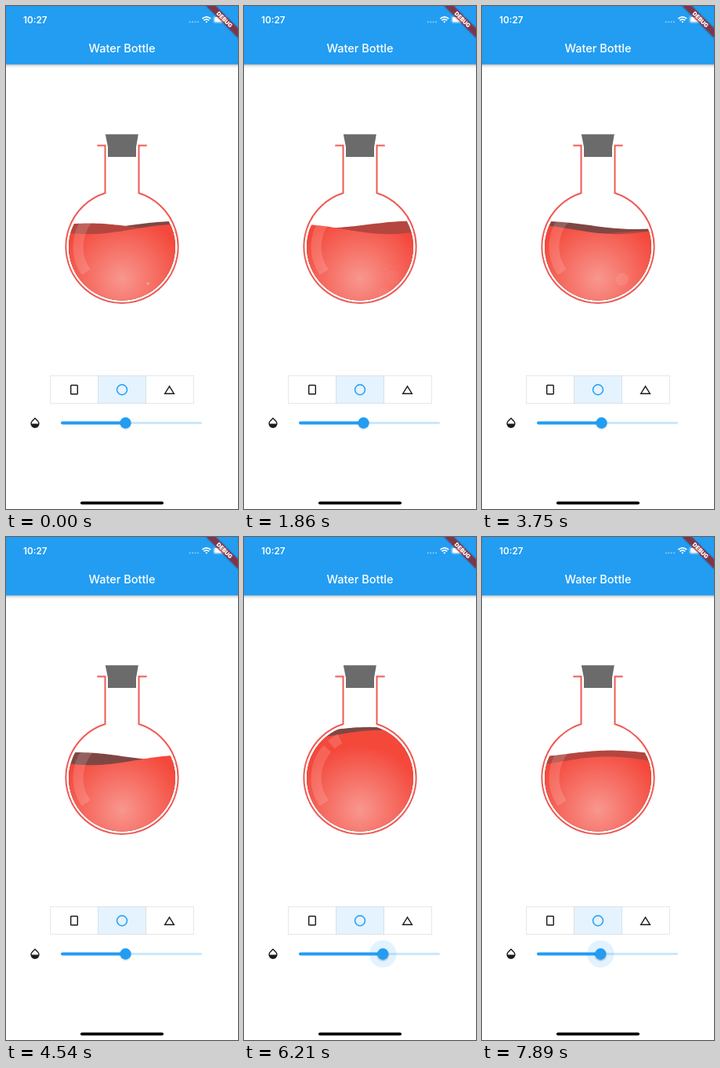
These frames come from a looping animation (296 px wide and 640 px high, 8 s). An HTML page:

```html
<!DOCTYPE html>
<html lang="en">
<head>
<meta charset="utf-8">
<title>Water Bottle</title>
<style>
  html, body { margin: 0; width: 100%; height: 100%; overflow: hidden; background: #fff; }
  svg { display: block; width: 100vw; height: 100vh; --blue: #229df2; --ink: #1c1c1c; }
  text { font-family: Inter, Roboto, sans-serif; fill: #fff; }
</style>
</head>
<body>
<svg viewBox="0 0 296 640" preserveAspectRatio="none">
  <defs>
    <radialGradient id="glow" gradientUnits="userSpaceOnUse" cx="148" cy="347" r="82">
      <stop offset="0" stop-color="#f8978f"/>
      <stop offset="1" stop-color="#f4483b"/>
    </radialGradient>
    <linearGradient id="shade" x2="0" y2="1">
      <stop offset="0" stop-color="#000" stop-opacity=".26"/>
      <stop offset=".4" stop-color="#000" stop-opacity=".1"/>
      <stop offset="1" stop-color="#000" stop-opacity="0"/>
    </linearGradient>
    <clipPath id="bowl"><circle cx="148" cy="306.5" r="68"/></clipPath>
    <clipPath id="wet"><path id="wetPath"/></clipPath>
    <filter id="blur" x="-50%" y="-50%" width="200%" height="200%"><feGaussianBlur stdDeviation="1.2"/></filter>
  </defs>
  <rect width="296" height="640" fill="#fff"/>

  <!-- app bar -->
  <rect y="74" width="296" height="5" fill="url(#shade)"/>
  <rect width="296" height="74.3" fill="var(--blue)"/>
  <text x="22" y="22" font-size="11.7" font-weight="600">10:27</text>
  <text x="148" y="59.3" font-size="14.5" font-weight="500" text-anchor="middle">Water Bottle</text>
  <path d="M234.8 20.3h12" stroke="#fff" stroke-opacity=".45" stroke-width="2.2" stroke-linecap="round" stroke-dasharray="0 3.4"/>
  <g fill="none" stroke="#fff" stroke-width="1.7">
    <path d="M250.4 16.2Q255.8 11.4 261.2 16.2M252.4 18.4Q255.8 15.4 259.2 18.4"/>
    <path d="M254.3 19.9Q255.8 18.6 257.3 19.9L255.8 21.4Z" fill="#fff" stroke="none"/>
  </g>
  <rect x="264.5" y="12.8" width="17.5" height="8.8" rx="2.6" fill="none" stroke="#fff" stroke-opacity=".45" stroke-width=".8"/>
  <rect x="265.7" y="14" width="15.1" height="6.4" rx="1.5" fill="#fff"/>
  <path d="M283 15.7q1.6 1.5 0 3z" fill="#fff" fill-opacity=".5"/>
  <g transform="translate(296 0) rotate(45)">
    <rect x="-28.6" y="20" width="57.2" height="8.6" fill="#000" opacity=".35" filter="url(#blur)"/>
    <rect x="-28.6" y="20" width="57.2" height="8.6" fill="#b71c1c" fill-opacity=".63"/>
    <text y="26.9" font-size="7.3" font-weight="900" text-anchor="middle">DEBUG</text>
  </g>

  <!-- flask -->
  <g clip-path="url(#bowl)">
    <path id="back" fill="#7f4744"/>
    <path id="mid" fill="#b4463f"/>
    <path id="front" fill="url(#glow)"/>
    <g id="bubbles" clip-path="url(#wet)" fill="#fff"></g>
    <g id="glare" fill="none" stroke="#fff" stroke-opacity=".15" stroke-width="13"></g>
  </g>
  <path d="M116.3 177.5H126.5V238A71.6 71.6 0 1 0 169.5 238V177.5H179.7" fill="none" stroke="#ee5a54" stroke-width="2"/>
  <path d="M126.8 163.2H168.8L166 179.5V192H130V179.5Z" fill="#6b6b6b"/>

  <!-- shape buttons -->
  <rect x="117.5" y="470.5" width="61" height="35" fill="var(--blue)" fill-opacity=".12"/>
  <path d="M56.5 470.5H239.5V505.5H56.5ZM117.5 470.5V505.5M178.5 470.5V505.5" fill="none" stroke="#000" stroke-opacity=".12" stroke-width=".8"/>
  <g fill="none" stroke="var(--ink)" stroke-width="1.45">
    <rect x="82.7" y="482.4" width="8.6" height="11.4" rx=".8"/>
    <circle cx="148" cy="488.2" r="6.45" stroke="var(--blue)"/>
    <path d="M208.5 483.9L214.3 493.2H202.7Z"/>
  </g>

  <!-- slider -->
  <path transform="translate(28.6 521.8) scale(.7)" fill="var(--ink)" d="M17.66 8L12 2.35 6.34 8C4.78 9.56 4 11.64 4 13.64s.78 4.11 2.34 5.67 3.61 2.35 5.66 2.35 4.1-.79 5.66-2.35S20 15.64 20 13.64 19.22 9.56 17.66 8zM6 14c.01-2 .62-3.27 1.76-4.4L12 5.27l4.24 4.38C17.38 10.77 17.99 12 18 14H6z"/>
  <rect x="70" y="529.1" width="180" height="2.8" rx="1.4" fill="var(--blue)" fill-opacity=".24"/>
  <rect id="active" x="70" y="528.4" height="4.2" rx="2.1" fill="var(--blue)"/>
  <g id="thumb">
    <circle id="halo" fill="var(--blue)" fill-opacity=".13"/>
    <circle id="thumbShadow" cy="1.4" r="7" fill="#000" filter="url(#blur)"/>
    <circle r="7.15" fill="var(--blue)"/>
  </g>
  <rect x="95" y="630.4" width="106" height="3.8" rx="1.9" fill="#000"/>
</svg>
<script>
const LOOP = 8000;
const el = id => document.getElementById(id);
const clamp = v => Math.max(0, Math.min(1, v));
const smooth = v => (1 - Math.cos(Math.PI * clamp(v))) / 2;

function add(parent, tag, attrs) {
  const node = document.createElementNS('http://www.w3.org/2000/svg', tag);
  for (const key in attrs) node.setAttribute(key, attrs[key]);
  el(parent).append(node);
  return node;
}

// The thumb is dragged right, then back; the water follows it.
const thumbX = t => 152.5 + 25 * smooth((t - 5000) / 1300) - 26.2 * smooth((t - 6400) / 1490);
const level = t => 278 - 1.3 * (thumbX(t) - 152.5);

// Each wave is one sine that slides sideways between turning points.
const WAVELENGTH = 230;
const turns = [0, 1080, 2750, 3750, 5210, 6210, 7890];
const waves = {
  back: { depth: 1, height: 5, crest: [216, 225, 205, 80, 100, 160, 165] },
  mid: { depth: 0, height: 4.5, crest: [105, 225, 205, 205, 205, 205, 165], sink: [3, 0, 0, 13, 13, 13, -3.5] },
  front: { depth: 6, height: 6.2, crest: [220, 330, 263, 287, 175, 175, 160] }
};

function between(points, t) {
  let i = 0;
  while (i < turns.length - 2 && t >= turns[i + 1]) i++;
  const k = smooth((t - turns[i]) / (turns[i + 1] - turns[i]));
  return points[i] + (points[i + 1] - points[i]) * k;
}

function surface({ depth, height, crest, sink }, t) {
  const rest = level(t) + depth + (sink ? between(sink, t) : 0);
  const top = between(crest, t);
  let d = 'M80 376';
  for (let x = 80; x <= 216; x += 4) {
    const y = rest - height * Math.cos(2 * Math.PI * (x - top) / WAVELENGTH);
    d += `L${x} ${y.toFixed(2)}`;
  }
  return d + 'L216 376Z';
}

// Bubbles drift up, fading in and out around their peak.
const bubbles = [
  { x: 181, y: 353, r: 1.6, peak: 0, life: 2200, alpha: .35 },
  { x: 190, y: 353, r: 9, peak: 1080, life: 1000, alpha: .15 },
  { x: 179, y: 355, r: 8, peak: 3000, life: 1500, alpha: .19 }
];
for (const b of bubbles) b.node = add('bubbles', 'circle', { cx: b.x, r: b.r });

function moveBubble({ node, y, peak, life, alpha }, t) {
  const age = t - peak;
  node.setAttribute('cy', y - age * .01);
  node.setAttribute('opacity', alpha * clamp(1 - Math.abs(age) / life));
}

function arc(from, to) {
  const at = a => [148 + 56 * Math.cos(a * Math.PI / 180), 306.5 + 56 * Math.sin(a * Math.PI / 180)];
  add('glare', 'path', { d: `M${at(from)}A56 56 0 0 1 ${at(to)}` });
}
arc(145, 222);
arc(229, 243);

function draw(t) {
  for (const name in waves) el(name).setAttribute('d', surface(waves[name], t));
  el('wetPath').setAttribute('d', el('front').getAttribute('d'));
  for (const b of bubbles) moveBubble(b, t);
  const x = thumbX(t);
  const press = smooth((t - 4750) / 250);
  el('active').setAttribute('width', x - 70);
  el('thumb').setAttribute('transform', `translate(${x} 530.5)`);
  el('halo').setAttribute('r', 17.2 * press);
  el('thumbShadow').setAttribute('opacity', .15 + .2 * press);
}

const begin = performance.now();
function tick() {
  draw((performance.now() - begin) % LOOP);
  requestAnimationFrame(tick);
}
tick();
</script>
</body>
</html>
```
